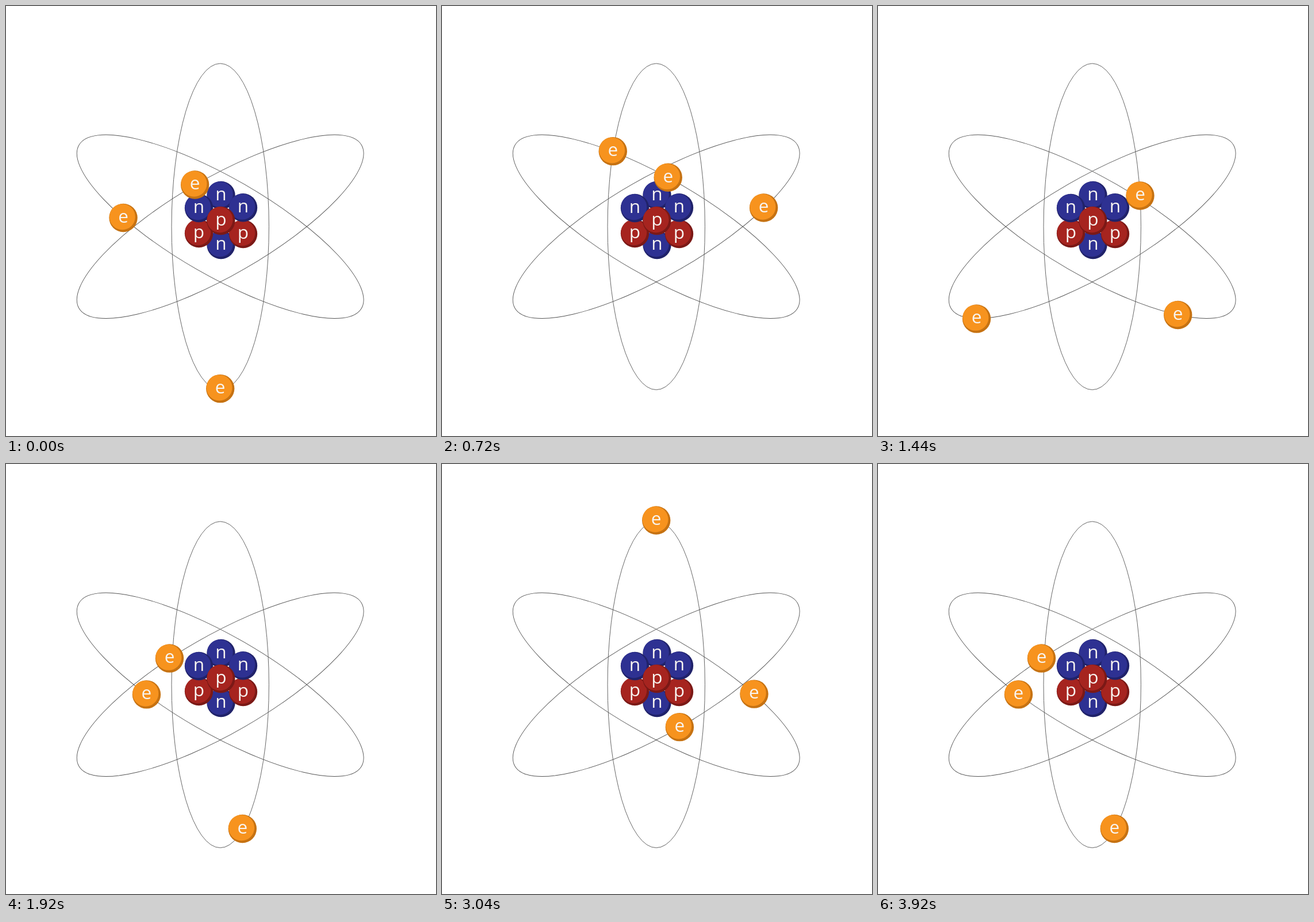
An HTML page for the animation above (4 s loop, 748 by 748 pixels).

```html
<!DOCTYPE html>
<html lang="en">
<head>
<meta charset="utf-8">
<title>Atom</title>
<style>
  html, body { margin: 0; width: 100%; height: 100%; overflow: hidden; background: #fff; }
  svg { display: block; width: 100vw; height: 100vh; }
  text { font: 500 31.5px "Open Sans", "Noto Sans", sans-serif; fill: #f8f4f0; text-anchor: middle; }
  path { fill: none; stroke: #555; stroke-width: 0.9; }
</style>
</head>
<body>
<svg viewBox="0 0 748 748"></svg>
<script>
const svg = document.querySelector('svg');
const CENTER = { x: 372.7, y: 383.8 };
const LOOP = 2000, STEP = 80, POSES = 48;

// Light face over a darker disc, which shows as a crescent at lower right.
const COLORS = {
  n: ['#2e3192', '#20226a'],
  p: ['#a6241f', '#7b1916'],
  e: ['#f7931e', '#c67212']
};

function add(parent, tag, attributes, text = '') {
  const node = document.createElementNS('http://www.w3.org/2000/svg', tag);
  for (const name in attributes) node.setAttribute(name, attributes[name]);
  node.textContent = text;
  return parent.appendChild(node);
}

function place(node, x, y) {
  node.setAttribute('transform', `translate(${x} ${y})`);
}

function addBall(kind, x = 0, y = 0) {
  const ball = add(svg, 'g', {});
  const [face, edge] = COLORS[kind];
  add(ball, 'circle', { r: 24.7, fill: edge });
  add(ball, 'circle', { cx: -1.7, cy: -1.7, r: 22.5, fill: face });
  add(ball, 'text', { x: 0, y: 8.3 }, kind);
  place(ball, x, y);
  return ball;
}

// Each orbit is the same ellipse, turned about the centre; travel starts at its bottom.
// dx and dy shift the electron slightly off its line.
const orbits = [
  { turn: 0, start: 0, dx: 0, dy: -2 },
  { turn: 60, start: 0.25, dx: -1.7, dy: 0.5 },
  { turn: -60, start: 0.375, dx: 0.8, dy: 0.5 }
];
for (const orbit of orbits) {
  orbit.path = add(svg, 'path', {
    d: 'M0 283.8A84.7 283.8 0 0 1 0 -283.8A84.7 283.8 0 0 1 0 283.8Z',
    transform: `translate(${CENTER.x} ${CENTER.y}) rotate(${orbit.turn})`
  });
}
const length = orbits[0].path.getTotalLength();

addBall('n', 374, 329.5);
addBall('n', 374, 415.5);
addBall('p', 335.5, 395.5);
addBall('p', 412.5, 396.5);
addBall('n', 335.5, 351.5);
addBall('n', 412.5, 350.8);
addBall('p', 373.8, 373.5);

for (const orbit of orbits) orbit.electron = addBall('e');

function draw(now) {
  const tick = Math.floor((now % LOOP) / STEP);
  const phase = Math.floor(tick * POSES * STEP / LOOP) / POSES;
  for (const { path, turn, start, dx, dy, electron } of orbits) {
    const point = path.getPointAtLength((phase + start) % 1 * length);
    const angle = turn * Math.PI / 180, cos = Math.cos(angle), sin = Math.sin(angle);
    place(electron,
      CENTER.x + dx + point.x * cos - point.y * sin,
      CENTER.y + dy + point.x * sin + point.y * cos);
  }
  requestAnimationFrame(draw);
}
draw(0);
</script>
</body>
</html>
```
